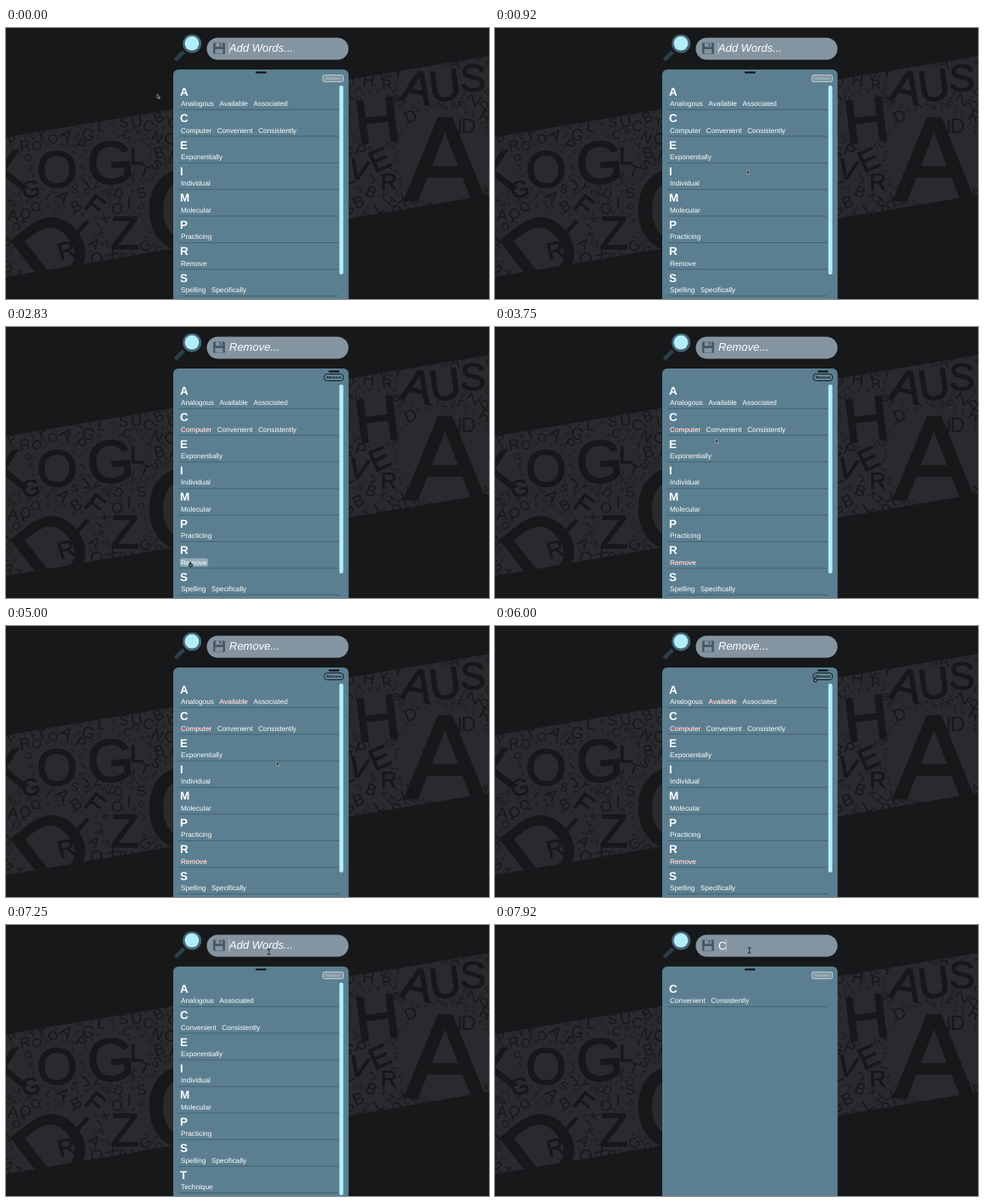
Write an HTML page with a canvas that moves like this. It is 569 by 320 pixels and loops after 8 s.

```html
<!DOCTYPE html>
<html lang="en">
<head>
<meta charset="utf-8">
<title>Word list</title>
<style>
html, body { margin: 0; width: 100%; height: 100%; overflow: hidden; background: #17181a; }
canvas { display: block; }
</style>
</head>
<body>
<canvas id="stage" width="569" height="320"></canvas>
<script>
const W = 569, H = 320, LOOP = 8000;
const FONT = '"Liberation Sans", Arial, sans-serif';
const ctx = document.getElementById('stage').getContext('2d');

const REMOVE_ON = 1450, REMOVE_OFF = 6290, DELETED = 6400, FOCUS = 7200, TYPED = 7830;

const groups = [
  ['A', 'Analogous', 'Available', 'Associated'],
  ['C', 'Computer', 'Convenient', 'Consistently'],
  ['E', 'Exponentially'],
  ['I', 'Individual'],
  ['M', 'Molecular'],
  ['P', 'Practicing'],
  ['R', 'Remove'],
  ['S', 'Spelling', 'Specifically'],
  ['T', 'Technique']
];

// Times at which a word is entered, clicked and left by the pointer
const picked = {
  Computer: { enter: 1600, click: 1700, leave: 1840 },
  Remove: { enter: 2550, click: 3050, leave: 3520 },
  Available: { enter: 4200, click: 4430, leave: 4680 }
};

// time, x, y
const pointerPath = [
  [0, 178, 79], [80, 178, 79], [350, 166, 108], [830, 288, 179], [1330, 384, 61],
  [1450, 384, 61], [1640, 229, 121], [1720, 231, 121], [1830, 265, 129], [2250, 229, 258],
  [2600, 217, 279], [3450, 217, 279], [3750, 260, 133], [4250, 269, 90], [4560, 271, 91],
  [5000, 318.6, 161], [5220, 284, 118], [5670, 377, 62], [6680, 377, 62], [7180, 312, 32],
  [7450, 299.7, 30], [8000, 299.7, 30]
];

const clamp = v => Math.max(0, Math.min(1, v));
const ramp = (t, start, length) => clamp((t - start) / length);
const smooth = p => p * p * (3 - 2 * p);
const mix = (a, b, p) => a + (b - a) * p;

function text(c, str, x, y, size, color, style = '') {
  c.font = `${style} ${size}px ${FONT}`;
  c.fillStyle = color;
  c.fillText(str, x, y);
}

function box(x, y, w, h, r, color) {
  ctx.beginPath();
  ctx.roundRect(x, y, w, h, r);
  ctx.fillStyle = color;
  ctx.fill();
}

function line(x1, y1, x2, y2, width, color) {
  ctx.beginPath();
  ctx.moveTo(x1, y1);
  ctx.lineTo(x2, y2);
  ctx.lineWidth = width;
  ctx.strokeStyle = color;
  ctx.stroke();
}

function disc(x, y, r, color) {
  ctx.beginPath();
  ctx.arc(x, y, r, 0, 7);
  ctx.fillStyle = color;
  ctx.fill();
}

function makeBackdrop() {
  const canvas = document.createElement('canvas');
  canvas.width = W;
  canvas.height = H;
  const c = canvas.getContext('2d');
  const dark = '#17181a';
  c.fillStyle = dark;
  c.fillRect(0, 0, W, H);
  c.beginPath();
  c.moveTo(0, 129);
  c.lineTo(W, 33);
  c.lineTo(W, 197);
  c.lineTo(0, 294);
  c.clip();
  c.fillStyle = '#292a2e';
  c.fillRect(0, 0, W, H);
  c.textAlign = 'center';
  c.lineJoin = 'round';

  // A thin outline gives the large letters a medium weight
  const letter = (ch, x, y, size, turn) => {
    c.save();
    c.translate(x, y);
    c.rotate(turn * Math.PI / 180);
    text(c, ch, 0, size * .36, size, dark);
    c.lineWidth = size * .025;
    c.strokeStyle = dark;
    if (size > 24) c.strokeText(ch, 0, size * .36);
    c.restore();
  };
  // letter, x, y, size, rotation
  const placed = [
    ['K', 0, 170, 66, -12], ['O', 60, 166, 62, 0], ['G', 123, 158, 71, -4],
    ['Z', 140, 241, 55, 0], ['D', 54, 261, 112, -38], ['I', 88, 237, 38, 42],
    ['O', 217, 213, 136, 0], ['F', 105, 209, 32, 38], ['G', 29, 190, 28, -12],
    ['L', 154, 150, 30, 0], ['R', 71, 262, 28, -15], ['H', 437, 108, 74, -7],
    ['A', 485, 69, 54, 12], ['U', 517, 67, 52, -8], ['S', 550, 58, 46, 0],
    ['A', 517, 153, 140, 0], ['V', 416, 167, 34, 12], ['E', 440, 155, 36, -24],
    ['R', 451, 181, 27, 0], ['N', 529, 116, 24, 0], ['D', 545, 115, 24, 0]
  ];
  placed.forEach(p => letter(...p));

  let seed = 7;
  const random = () => (seed = (seed * 16807) % 2147483647) / 2147483647;
  const alphabet = 'ABCDEFGHIJKLNOPQRSTUVXYZ';
  for (let i = 0; i < 9000; i++) {
    const size = mix(20, 6, Math.min(1, i / 3500));
    const x = random() * W;
    const y = 129 - x * .168 + random() * 166;
    const ch = alphabet[Math.floor(random() * alphabet.length)];
    const turn = (random() - .5) * 110;
    if (x > 200 && x < 400) continue;
    if (placed.some(p => Math.hypot(p[1] - x, p[2] - y) < (p[3] + size) * .39)) continue;
    placed.push([ch, x, y, size, turn]);
    letter(ch, x, y, size, turn);
  }
  return canvas;
}

const backdrop = makeBackdrop();
ctx.textRendering = 'geometricPrecision';

function drawSearch(t) {
  line(209.5, 28, 199.3, 38, 4.6, '#2b3f4a');
  disc(219.2, 18.4, 11, '#456675');
  disc(219, 18.2, 8.4, '#b3edfa');
  box(236.5, 11.5, 167, 26, 13, '#8495a1');

  box(244, 17.3, 14, 13.5, 1.5, '#4a5865');
  box(247, 17.5, 8, 4.6, 0, '#8495a1');
  box(251.5, 18, 2, 3.3, 0, '#4a5865');
  box(246.5, 25, 9, 5.4, 0, '#8495a1');

  const swap = 320;
  if (t >= TYPED) {
    text(ctx, 'C', 263, 28.5, 13.2, '#fff');
  } else {
    const removing = t >= REMOVE_ON + swap && t < REMOVE_OFF + swap;
    text(ctx, removing ? 'Remove...' : 'Add Words...', 263, 28.2, 13, '#fff', 'italic');
  }
  const caretOn = t < REMOVE_ON ? t < 300 || (t > 830 && t < 1330)
    : t >= TYPED || (t >= FOCUS && t < FOCUS + 530);
  if (caretOn) box(t >= TYPED ? 272 : 262.7, 17, .8, 14, 0, '#c3cdd4');
}

function drawToggle(t) {
  const removing = t >= REMOVE_ON && t < REMOVE_OFF;
  const since = removing ? t - REMOVE_ON : t >= REMOVE_OFF ? t - REMOVE_OFF : 9999;
  const slide = smooth(ramp(since, 0, 230));
  const on = removing ? slide : 1 - slide;
  box(mix(294, 380, on), 51.4, 12.8, 2.2, 1, '#0a0c0e');

  // The old outline fades away before the new one appears
  const half = since < 280;
  const dark = removing !== half;
  const alpha = half ? 1 - since / 280 : ramp(since, 280, 330);
  const fade = ramp(since, 0, 620);
  const fill = removing ? mix(.75, .2, fade) : mix(.2, .75, Math.min(1, fade * 2));
  const x = mix(373.3, 374.8, on), w = mix(24.2, 22.8, on);
  const color = dark ? `rgba(16,28,36,${alpha})` : `rgba(190,203,210,${alpha})`;
  box(x, 55.5, w, 8, mix(2, 3.5, on), `rgba(144,160,170,${fill})`);
  ctx.lineWidth = 1;
  ctx.strokeStyle = color;
  ctx.stroke();
  text(ctx, 'Remove', x + w / 2 - 8.7, 61.1, 4.6, color, dark ? 'bold' : '');
}

function drawWord(word, x, y, t) {
  ctx.font = `8.25px ${FONT}`;
  const width = ctx.measureText(word).width;
  const pick = picked[word];
  if (pick) {
    const glow = ramp(t, pick.enter, 80) * (1 - ramp(t, pick.leave, 200));
    if (glow) box(x - 1.3, y - 7.8, width + 2.6, 9.8, 2.5, `rgba(190,213,224,${.5 * glow})`);
    const struck = ramp(t, pick.click, 120);
    if (struck) line(x - .5, y - 2.4, x + width + .5, y - 2.4, 1.1, `rgba(226,84,84,${struck})`);
  }
  text(ctx, word, x, y, 8.25, '#fff');
  return width;
}

function visibleGroups(t) {
  if (t < DELETED) return groups;
  return groups
    .map(group => group.filter(word => !picked[word]))
    .filter(group => group.length > 1 && (t < TYPED || group[0] === 'C'));
}

function drawPanel(t) {
  box(197, 49, 206.6, 280, 6, '#5b7f90');
  drawToggle(t);
  visibleGroups(t).forEach(([head, ...words], row) => {
    const y = row * 31.42;
    text(ctx, head, 205, y + 79.8, 13.5, '#fff', 'bold');
    let x = 206;
    for (const word of words) x += drawWord(word, x, y + 92.2, t) + 6.6;
    line(203, y + 96.4, 392, y + 96.4, .8, '#3e5c6c');
  });
  if (t < TYPED) box(392.7, 68, 4.7, t < DELETED ? 223 : 251, 2, '#b2edfa');
}

function drawPointer(t) {
  const next = Math.max(1, pointerPath.findIndex(p => p[0] > t));
  const [t0, x0, y0] = pointerPath[next - 1], [t1, x1, y1] = pointerPath[next];
  const p = smooth(ramp(t, t0, t1 - t0));
  const x = mix(x0, x1, p), y = mix(y0, y1, p);
  if (y < 38 && x > 236) {
    line(x, y - 3, x, y + 3, .9, '#20282e');
    line(x - 2, y - 3, x + 2, y - 3, .9, '#20282e');
    line(x - 2, y + 3, x + 2, y + 3, .9, '#20282e');
    return;
  }
  const overButton = x > 373 && y < 66;
  const overWord = Object.values(picked).some(k => t > k.enter && t < k.leave);
  if (overButton || overWord) {
    box(x - 2, y, 5, 4.6, 2, '#252d33');
    box(x - .8, y - 2, 1.6, 4, .8, '#252d33');
    box(x - .6, y + 1.2, 2.4, 2, 1, '#8b979e');
    return;
  }
  ctx.beginPath();
  ctx.moveTo(x, y - 1);
  ctx.lineTo(x, y + 4);
  ctx.lineTo(x + 1.3, y + 3);
  ctx.lineTo(x + 2.3, y + 5);
  ctx.lineTo(x + 3.2, y + 4.5);
  ctx.lineTo(x + 2.3, y + 2.7);
  ctx.lineTo(x + 3.7, y + 2.6);
  ctx.closePath();
  ctx.fillStyle = '#14181b';
  ctx.fill();
  ctx.lineWidth = .6;
  ctx.strokeStyle = '#c3cbd0';
  ctx.stroke();
}

function draw() {
  const t = performance.now() % LOOP;
  ctx.drawImage(backdrop, 0, 0);
  drawSearch(t);
  drawPanel(t);
  drawPointer(t);
  requestAnimationFrame(draw);
}
draw();
</script>
</body>
</html>
```
